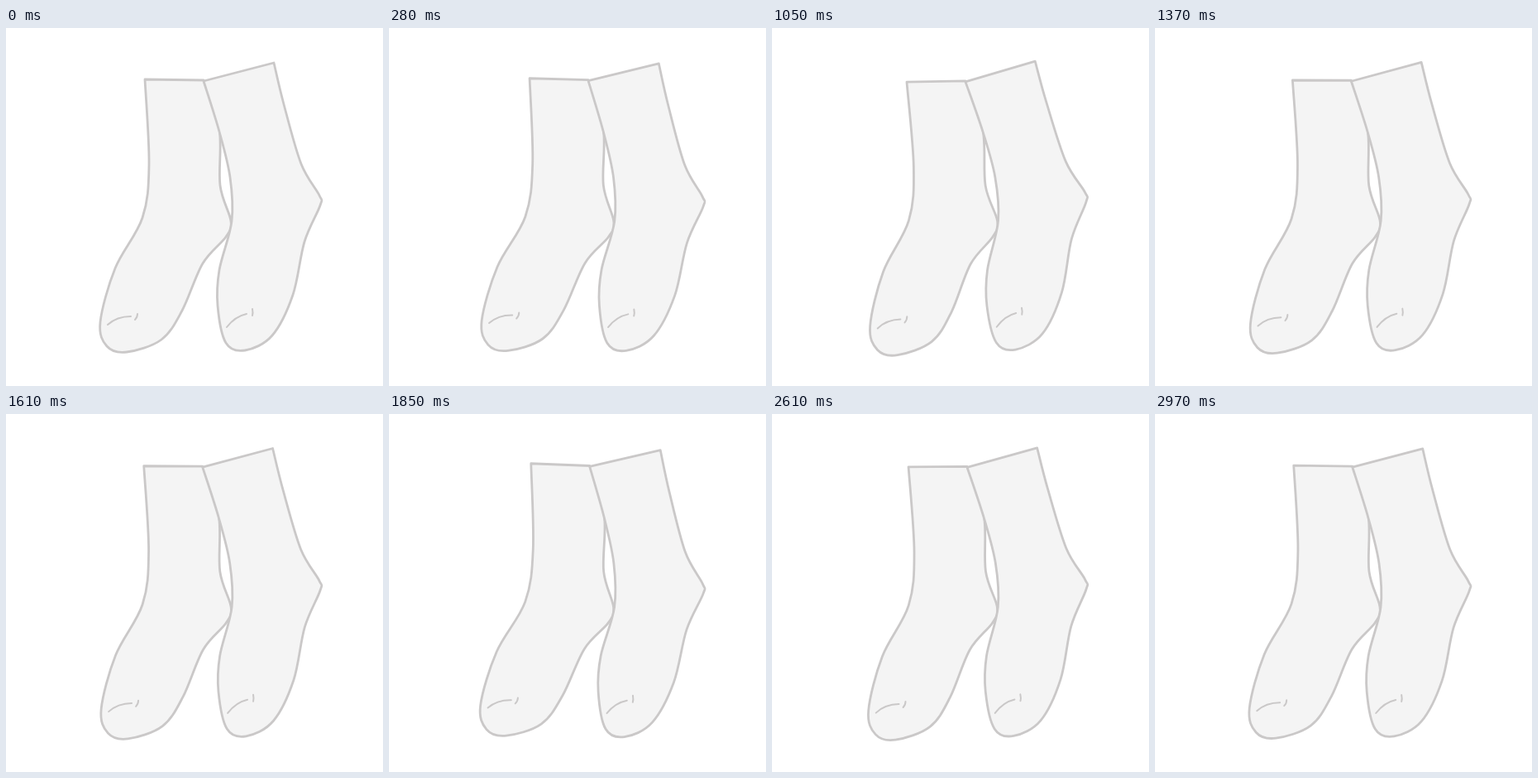
An HTML page that plays this animation: 456 px wide and 432 px high, repeating every 3010 ms.

```html
<!DOCTYPE html>
<html lang="en">
<head>
<meta charset="utf-8">
<title>Swinging socks</title>
<style>
html, body { margin: 0; width: 100%; height: 100%; overflow: hidden; background: #fff; }
svg { display: block; width: 456px; height: 432px; }
path { fill: none; stroke: #cac8c8; stroke-width: 2.8; stroke-linecap: round; stroke-linejoin: round; }
.sock { fill: #f4f4f4; }
.crease { stroke-width: 2; }
</style>
</head>
<body>
<svg viewBox="0 0 456 432">
  <g id="pair">
    <path class="sock" id="left"/>
    <path class="sock" id="right"/>
    <path class="crease" d="M123 358Q134 348 151 348M159 345Q159 349 156 352"/>
    <path class="crease" d="M267 361Q277 348 291 345M298 339Q299 344 298 347"/>
  </g>
</svg>
<script>
const LOOP = 3010, STEP = 40, HOLD = 320, RESUME = 610;
// Angles in degrees, evenly spread over the loop.
const swing = [0, 1.5, -2, 0.7, 1.5, -2, 0.1, -2.2, 1.4, 1.4, -0.8, -2.2, -1.1, -1];

// A smooth outline through the points; the cuff is the straight closing line.
function outline(text) {
  const points = text.split(" ").map(p => p.split(",").map(Number));
  const at = i => points[Math.max(0, Math.min(i, points.length - 1))];
  let d = "M" + points[0];
  for (let i = 0; i < points.length - 1; i++) {
    const a = at(i), b = at(i + 1);
    const c1 = a.map((v, k) => v + (b[k] - at(i - 1)[k]) / 6);
    const c2 = b.map((v, k) => v - (at(i + 2)[k] - a[k]) / 6);
    d += `C${c1} ${c2} ${b}`;
  }
  return d + "Z";
}

const byId = id => document.getElementById(id);
byId("left").setAttribute("d", outline(
  "168,62 173,165 165,229 132,290 114,355 122,384 146,391 188,376 213,341 238,284 266,252 272,233 259,190 258,122 239,63"));
byId("right").setAttribute("d", outline(
  "239,64 258,125 271,180 273,233 258,292 256,335 266,380 289,389 322,371 347,322 361,258 380,214 379,202 357,164 336,92 324,42"));

const snap = t => Math.floor(t / STEP) * STEP;

// The swing advances in steps and rests between HOLD and RESUME.
function stepped(t) {
  return t < RESUME ? Math.min(snap(t), HOLD) : RESUME + snap(t - RESUME);
}

function angleAt(t) {
  const place = t / LOOP * swing.length, i = Math.floor(place);
  const from = swing[i], to = swing[(i + 1) % swing.length];
  const ease = (1 - Math.cos(Math.PI * (place - i))) / 2;
  return from + (to - from) * ease;
}

const start = performance.now();
function draw() {
  const t = stepped((performance.now() - start) % LOOP);
  byId("pair").setAttribute("transform", `rotate(${angleAt(t)} 262 216)`);
  requestAnimationFrame(draw);
}
draw();
</script>
</body>
</html>
```
